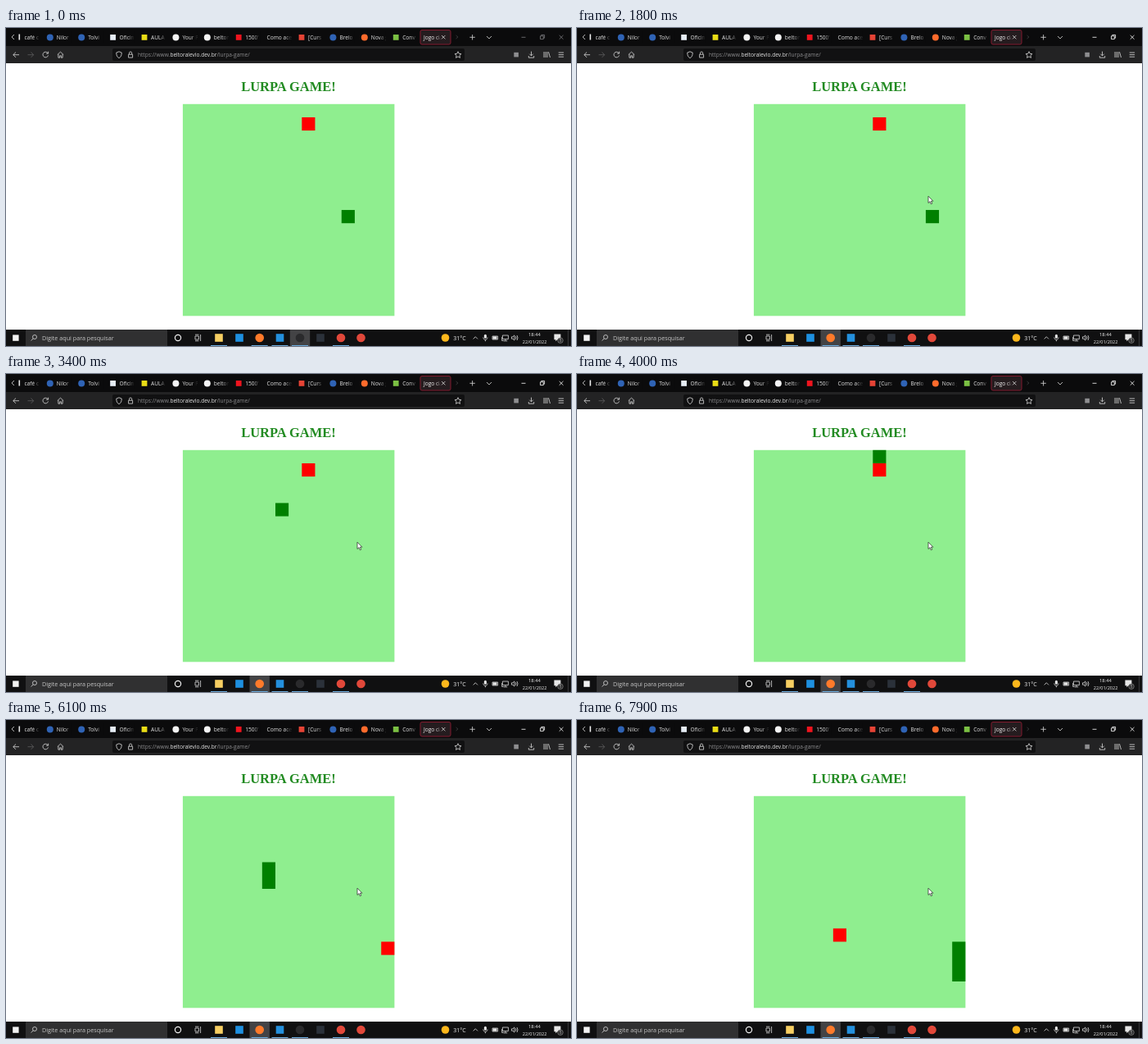
Recreate the animation shown at these times as an HTML page. Size 690 by 388 pixels, loop 8000 ms.

```html
<!DOCTYPE html>
<html lang="pt-BR">
<head>
<meta charset="utf-8">
<title>Jogo</title>
<style>
  html, body { margin: 0; width: 100%; height: 100%; overflow: hidden; background: #fff; }
  svg { display: block; width: 100vw; height: 100vh; }
  text { font-family: "Open Sans", "Noto Sans", sans-serif; white-space: pre; }
  .line { fill: none; stroke: #d0d0d0; stroke-width: .85; }
  .heading { font: bold 16.5px "Liberation Serif", "Noto Serif", serif; fill: #228b22; }
</style>
</head>
<body>
<svg viewBox="0 0 690 388">
  <defs>
    <linearGradient id="fade"><stop offset="0" stop-color="#0b0b0c" stop-opacity="0"/><stop offset="1" stop-color="#0b0b0c"/></linearGradient>
    <linearGradient id="fadeActive"><stop offset="0" stop-color="#251c1f" stop-opacity="0"/><stop offset="1" stop-color="#251c1f"/></linearGradient>
  </defs>
  <rect width="690" height="388" fill="#fff"/>

  <!-- tab strip -->
  <rect width="690" height="22" fill="#0b0b0c"/>
  <path class="line" d="M10 8l-3 3 3 3"/>
  <rect x="15.5" y="7.5" width="1.6" height="7" fill="#e8e8e8"/>
  <g id="tabs"></g>
  <rect x="506" y="2.5" width="37" height="17.5" rx="2" fill="#251c1f" stroke="#821b2e"/>
  <text x="510" y="13.7" font-size="6.6" fill="#f4f4f4">Jogo da</text>
  <rect x="525" y="4" width="6" height="14" fill="url(#fadeActive)"/>
  <rect x="531" y="4" width="10" height="14" fill="#251c1f"/>
  <path class="line" d="M532 9l4.4 4.4M536.4 9l-4.4 4.4"/>
  <path class="line" d="M549.5 9l2.5 2-2.5 2" style="stroke:#3c3c3e"/>
  <path class="line" d="M566.4 11.3h6.4M569.6 8.1v6.4M587 10l3 3 3-3"/>
  <path class="line" id="controls" d="M629.5 11.3h5M652.5 9.8h3.8v3.8h-3.8zM653.8 9.6v-1.2h3.8v3.8h-1.2M675.7 8.9l4.8 4.8M680.5 8.9l-4.8 4.8"/>

  <!-- toolbar -->
  <rect y="22" width="690" height="21" fill="#232324"/>
  <path class="line" d="M16 32.7H8.8M12 29.5l-3.2 3.2 3.2 3.2"/>
  <path class="line" d="M26.5 32.7h7.2M30.5 29.5l3.2 3.2-3.2 3.2" style="stroke:#5b5b5d"/>
  <path class="line" d="M51 30.6a3.3 3.3 0 1 0 .5 2.8M51.6 28.7v2.5h-2.5"/>
  <path class="line" d="M62.8 32.6l3.7-3.4 3.7 3.4M63.9 32v4.2h1.8v-2.4h1.6v2.4h1.8V32"/>
  <rect x="130" y="25" width="430" height="15" rx="2" fill="#111112"/>
  <path class="line" d="M138 28.8l3.2 1.2c0 3.3-.7 5.3-3.2 6.7-2.5-1.4-3.2-3.4-3.2-6.7z"/>
  <path class="line" d="M149.6 32.2h5v3.9h-5zM150.5 32v-1.4a1.6 1.6 0 0 1 3.2 0V32"/>
  <text x="161" y="35.1" font-size="6.6" fill="#8c8c8e">https://www.<tspan fill="#e4e4e4">beltoralevio.dev.br</tspan>/lurpa-game/</text>
  <path class="line" d="M552 28.7l1.2 2.6 2.8.3-2.1 1.9.6 2.8-2.5-1.4-2.5 1.4.6-2.8-2.1-1.9 2.8-.3z"/>
  <rect x="620.3" y="29.8" width="5.6" height="5.6" fill="#8e8e90"/>
  <path class="line" d="M641.5 28.6v5.2M639.3 31.7l2.2 2.2 2.2-2.2M638.3 34v2.2h6.4V34"/>
  <path class="line" d="M657 29v7M659 29v7M661 29v7M662.5 29.2l2 6.8"/>
  <path class="line" d="M674.7 30h6.4M674.7 32.6h6.4M674.7 35.2h6.4"/>

  <!-- page -->
  <text class="heading" x="345" y="77.4" text-anchor="middle">LURPA GAME!</text>
  <rect x="215.9" y="92.8" width="258.5" height="258.5" fill="#8fee8f"/>
  <path id="snake" fill="#008000"/>
  <path id="food" fill="#f00"/>

  <!-- taskbar -->
  <rect y="368" width="690" height="20" fill="#101011"/>
  <rect x="24" y="368" width="173" height="20" fill="#303031"/>
  <rect x="8.2" y="374.4" width="7.4" height="7.4" fill="#f2f2f2"/>
  <circle class="line" cx="35" cy="377" r="2.5"/>
  <path class="line" d="M33.2 378.9l-2.6 2.6"/>
  <text x="44" y="380.8" font-size="7.2" fill="#c6c6c6">Digite aqui para pesquisar</text>
  <circle class="line" cx="210" cy="378" r="3.6" style="stroke:#f2f2f2;stroke-width:1.2"/>
  <path class="line" d="M231 376h4.4v4h-4.4zM231 374.2h4.4M231 381.8h4.4M237.6 374v8"/>
  <rect id="active" y="368" width="24.4" height="20" fill="#434345"/>
  <g id="apps"></g>
  <circle cx="536.5" cy="378" r="4.8" fill="#fdb71c"/>
  <text x="546.3" y="380.7" font-size="7" fill="#f0f0f0">31°C</text>
  <path class="line" d="M570.6 379.4l2.7-2.7 2.7 2.7"/>
  <rect x="583.9" y="373.8" width="3" height="5" rx="1.5" fill="#e6e6e6"/>
  <path class="line" d="M582.8 377.4c0 4 5.2 4 5.2 0M585.4 380.3v2"/>
  <path class="line" d="M594 376h6.6v4H594z"/>
  <rect x="594.5" y="376.3" width="5" height="3.4" fill="#e6e6e6"/>
  <path class="line" d="M606.4 375h7v4.6h-7zM609.9 379.6v2M607.8 381.8h4.4M605.7 377v4.5h2"/>
  <path class="line" d="M617.5 376.8h1.4l2-1.9v6.2l-2-1.9h-1.4zM622.4 376.3q1.2 1.7 0 3.4M624 375q2 3 0 6"/>
  <g fill="#f0f0f0" text-anchor="middle">
    <text x="645.4" y="376" font-size="5.8">18:44</text>
    <text x="645.6" y="384.6" font-size="5.6">22/01/2022</text>
  </g>
  <path d="M669.4 373.6h8v6.6h-4.2l-1.9 2v-2h-1.9z" fill="#e6e6e6"/>
  <circle cx="677" cy="381.2" r="3.3" fill="#2c2c2d" stroke="#b0b0b0" stroke-width=".5"/>
  <text x="677" y="383" font-size="5" fill="#fff" text-anchor="middle">1</text>
  <path d="M686.5 368v20" stroke="#4a4a4b" stroke-width=".7"/>

  <path id="cursor" d="M429 205.2v8.3l1.9-1.8 1.4 3.1 1.4-.6-1.4-3h2.6z" fill="#fff" stroke="#222" stroke-width=".7"/>
</svg>
<script>
const $ = id => document.getElementById(id);
const CELL = 16.155, LEFT = 215.9, TOP = 92.8, GRID = 16;
const TICK = 100, TICKS = 80;

// shape, colour, title
const blue = '#2f63b5';
const tabs = [
  ['c', blue, 'Nilor'], ['c', blue, 'Tolvi'], ['s', '#e6edf5', 'Oficin'], ['s', '#e9dc16', 'AULA'],
  ['c', '#f4f4f4', 'Your F'], ['c', '#f4f4f4', 'beltor'], ['s', '#f0141e', "1500'"], ['', '', 'Como ace'],
  ['s', '#e54335', '[Curs'], ['c', blue, 'Brelo'], ['c', '#ff6b2c', 'Nova g'], ['s', '#7bc043', 'Conv']
];
// centre, shape, colour, running
const apps = [
  [260, 's', '#f7cf62', 1], [285, 's', '#1e90e0', 0], [309.7, 'c', '#ff7a2a', 1], [334.5, 's', '#2490dd', 1],
  [359, 'c', '#2a2a2c', 1], [384, 's', '#2b313a', 0], [409, 'c', '#e1483a', 1], [433.5, 'c', '#e1483a', 0]
];

const icon = (shape, x, y, r, fill) => shape === 'c'
  ? `<circle cx="${x}" cy="${y}" r="${r}" fill="${fill}"/>`
  : shape && `<rect x="${x - r}" y="${y - r}" width="${2 * r}" height="${2 * r}" fill="${fill}"/>`;
const tabTitle = (x, title, end) =>
  `<text x="${x}" y="13.7" font-size="6.6" fill="#e4e4e4">${title}</text>
   <rect x="${end - 8}" y="4" width="8" height="14" fill="url(#fade)"/>
   <rect x="${end}" y="4" width="16" height="14" fill="#0b0b0c"/>`;

$('tabs').innerHTML = tabTitle(22.5, 'café c', 41) + tabs.map(([shape, fill, title], i) => {
  const x = 53.8 + i * 38.4;
  return tabTitle(shape ? x + 8 : x - 4, title, x + 26) + icon(shape, x, 11.4, shape === 'c' ? 4 : 3.4, fill);
}).join('');

$('apps').innerHTML = apps.map(([x, shape, fill, running]) =>
  icon(shape, x, 378, shape === 'c' ? 5.3 : 4.8, fill) +
  (running ? `<rect x="${x - 10}" y="387" width="20" height="1" fill="#6aa9dc"/>` : '')).join('');

// Head positions, one per game step
const DIRS = { R: [1, 0], L: [-1, 0], U: [0, -1], D: [0, 1] };
const path = [[12, 8]];
for (const [, dir, count] of 'R27 U8 R7 D1 L8 D5 R9 D7'.matchAll(/(\w)(\d+)/g)) {
  const [dx, dy] = DIRS[dir];
  for (let i = 0; i < +count; i++) {
    const [x, y] = path[path.length - 1];
    path.push([(x + dx + GRID) % GRID, (y + dy + GRID) % GRID]);
  }
}
// Ticks in which the game does not advance
const holds = [8, 19, 29, 41, 52, 63, 74];
const meals = [48, 70];
const foods = [[9, 1], [15, 11], [6, 10]];

const cell = ([x, y]) => `M${LEFT + x * CELL} ${TOP + y * CELL}h${CELL}v${CELL}h-${CELL}z`;

function draw(ms) {
  const tick = Math.floor(ms / TICK) % TICKS;
  const step = tick - holds.filter(h => h <= tick).length;
  const eaten = meals.filter(m => m <= step).length;
  $('snake').setAttribute('d', path.slice(Math.max(0, step - eaten), step + 1).map(cell).join(''));
  $('food').setAttribute('d', cell(foods[eaten]));
  $('cursor').setAttribute('visibility', tick < 8 ? 'hidden' : 'visible');
  $('controls').style.stroke = tick < 10 ? '#77777a' : '#f0f0f0';
  $('active').setAttribute('x', tick < 12 ? 346.8 : 297.5);
}

const start = performance.now();
function loop() {
  draw(performance.now() - start);
  requestAnimationFrame(loop);
}
draw(0);
requestAnimationFrame(loop);
</script>
</body>
</html>
```
